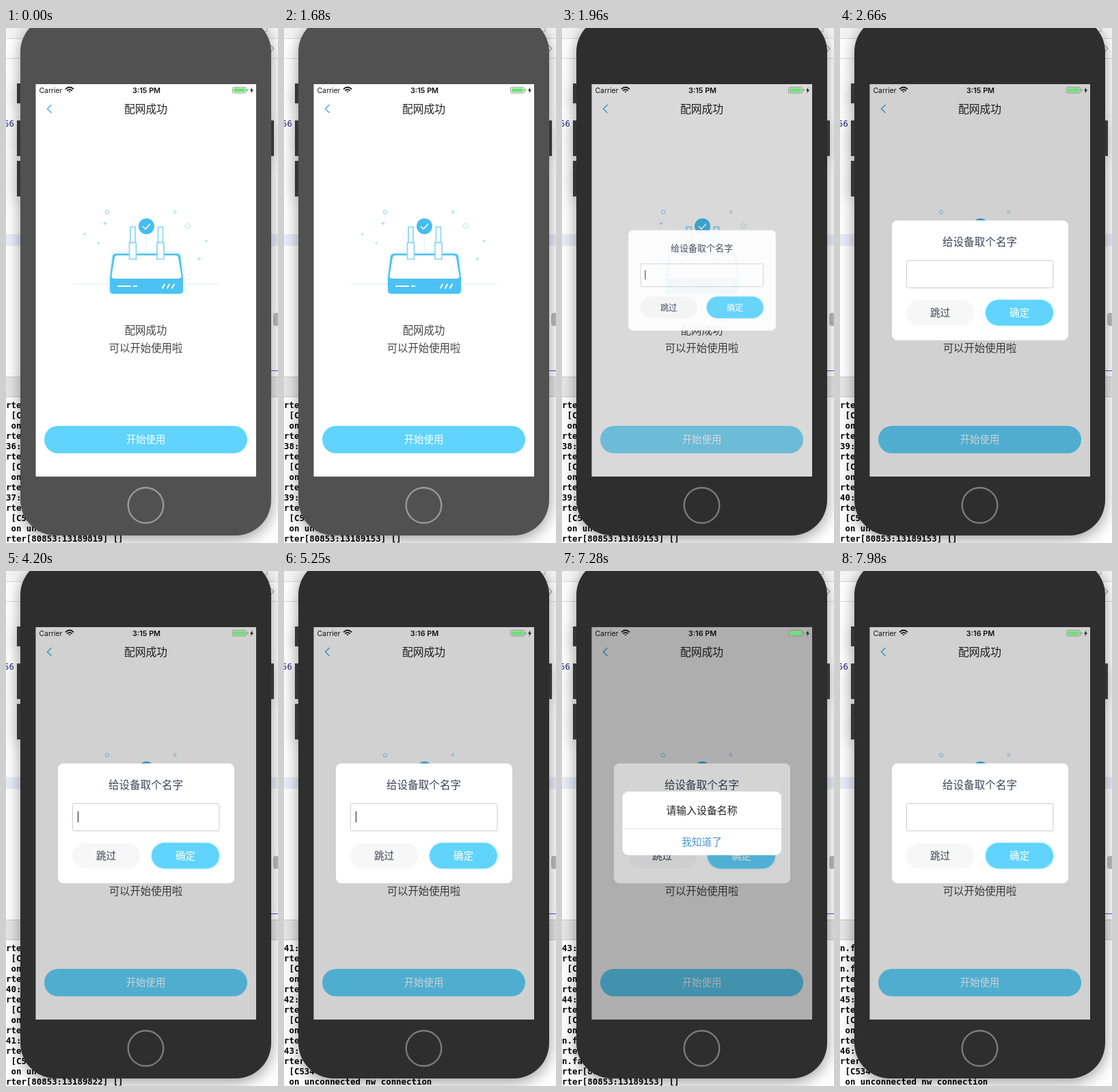
An HTML page that plays this animation: 398x752 px, repeating every 8000 ms.

```html
<!DOCTYPE html>
<html lang="zh">
<head>
<meta charset="utf-8">
<style>
html, body { margin: 0; height: 100%; overflow: hidden; background: #fff; }
svg { display: block; width: 100%; height: 100%; }
text { font-family: "Noto Sans CJK SC", "Noto Sans CJK", sans-serif; text-anchor: middle; }
.ui { font-family: Inter, sans-serif; fill: #111; }
#log text { font: bold 12.4px "DejaVu Sans Mono", monospace; text-anchor: start; white-space: pre; }
#phone { filter: drop-shadow(0 5px 11px rgba(0,0,0,.4)); }
</style>
</head>
<body>
<svg viewBox="0 0 398 752">
  <defs>
    <filter id="glow" x="-20%" y="-40%" width="140%" height="180%">
      <feDropShadow dx="0" dy="0" stdDeviation="2" flood-color="#60d4fd" flood-opacity=".5"/>
    </filter>
    <path id="plus" d="M-2.5 0H2.5M0-2.5V2.5"/>
    <g id="antenna">
      <rect x="-3.5" y="290.5" width="7" height="23"/>
      <rect x="-5" y="313.5" width="10" height="24"/>
    </g>
  </defs>

  <!-- editor window -->
  <rect width="398" height="752" fill="#fff"/>
  <rect width="398" height="16" fill="#f4f4f4"/>
  <path d="M0 15.5H398M0 44.5H398" stroke="#d8d8d8"/>
  <rect x="366" y="-6" width="16" height="11" fill="none" stroke="#aaa"/>
  <path d="M387 25l5 5-5 5" fill="none" stroke="#aaa" stroke-width="1.3"/>
  <text x="-3" y="144" style="font:12.4px 'DejaVu Sans Mono',monospace;text-anchor:start" fill="#2b2378">56</text>
  <rect y="301" width="398" height="17" fill="#e8edf9"/>
  <rect x="391" y="416" width="12" height="19" rx="4" fill="#bcbcbc"/>
  <path d="M380 500.5H398" stroke="#5a50c8"/>
  <rect y="510" width="398" height="28" fill="#e6e6e6"/>
  <path d="M0 509.5H398M0 538.5H398" stroke="#c8c8c8"/>
  <g id="log"></g>

  <!-- phone -->
  <g id="phone">
    <path d="M16 81h6v29h-6zM16 135h6v52h-6zM16 194h6v52h-6zM386 135h6v52h-6z" fill="#363636"/>
    <rect id="shell" x="21" y="-17" width="367" height="758" rx="52"/>
  </g>
  <circle id="home" cx="204.5" cy="697" r="25.8" fill="none" stroke-width="2.4"/>
  <rect x="43.5" y="82" width="322.5" height="573" fill="#fff"/>

  <path d="M66.5 112l-6 6 6 6" fill="none" stroke="#45b2e4" stroke-width="1.5"/>
  <text x="204.5" y="123.5" font-size="15.8" font-weight="500" fill="#222">配网成功</text>

  <!-- router -->
  <path d="M98 373.5H312" stroke="#e9eef0"/>
  <g fill="none" stroke="#8fd4f2">
    <circle cx="148" cy="269" r="2.7"/>
    <circle cx="247" cy="268.5" r="1.9"/>
    <path d="M265.5 284.8l4.2 4.2-4.2 4.2-4.2-4.2z" stroke="#a9dff5"/>
    <use href="#plus" x="145" y="285.5"/>
    <use href="#plus" x="283" y="337"/>
    <g stroke-width="1.4">
      <use href="#plus" transform="translate(115 301) scale(.7)"/>
      <use href="#plus" transform="translate(135 314) scale(.7)"/>
      <use href="#plus" transform="translate(293 311) scale(.7)"/>
    </g>
    <path d="M205.5 303V326" stroke="#dff3fb"/>
  </g>
  <g filter="url(#glow)">
    <path d="M161 329.5H250Q254 329.5 255 333L259 365V383Q259 388 254 388H157Q152 388 152 383V365L156 333Q157 329.5 161 329.5Z" fill="#4cc2f3"/>
    <path d="M163 332H248Q251 332 252 335L256.5 362Q256.5 366 252 366H159Q154.5 366 154.5 362L159 335Q160 332 163 332Z" fill="#fff"/>
  </g>
  <path d="M164 377H182M187 377H191M229 379.5l3-5M236 379.5l3-5M243 379.5l3-5" stroke="#fff" stroke-width="2.2" stroke-linecap="round"/>
  <g fill="#fff" stroke="#8ed8f6" stroke-width="1.8">
    <use href="#antenna" x="185.5"/>
    <use href="#antenna" x="226"/>
  </g>
  <circle cx="205.5" cy="289.5" r="11.5" fill="#45bdf0"/>
  <path d="M200 289.5l4 4 7-7.5" fill="none" stroke="#fff" stroke-width="1.7"/>

  <g font-size="15.4" fill="#444">
    <text x="204.5" y="447">配网成功</text>
    <text x="204.5" y="473">可以开始使用啦</text>
  </g>
  <g id="begin">
    <rect x="56" y="581" width="297" height="40" rx="20" fill="#60d4fd"/>
    <text x="204.5" y="606.3" font-size="14.4" fill="#fff">开始使用</text>
  </g>

  <rect id="shade1" x="43.5" y="82" width="322.5" height="573"/>

  <g id="dialog">
    <rect x="76" y="281" width="258" height="175" rx="8" fill="#fff"/>
    <text x="204.5" y="318" font-size="15.6" fill="#3a4358">给设备取个名字</text>
    <rect x="97.5" y="339.5" width="214.5" height="40" rx="2" fill="#fff" stroke="#cdcdcd"/>
    <path id="caret" d="M105.5 351V367" stroke="#555c68" stroke-width="1.6"/>
    <rect x="97" y="397" width="99.5" height="37.5" rx="18.7" fill="#f7f7f7"/>
    <text x="146.5" y="421.3" font-size="14.6" fill="#3a4358">跳过</text>
    <g id="confirm">
      <rect x="213" y="397" width="99" height="37.5" rx="18.7" fill="#60d4fd" filter="url(#glow)"/>
      <text x="262.5" y="421.3" font-size="14.6" fill="#fff">确定</text>
    </g>
  </g>

  <rect id="shade2" x="43.5" y="82" width="322.5" height="573"/>

  <g id="alert">
    <rect x="88.5" y="322" width="232.5" height="93" rx="9" fill="#fff"/>
    <text x="204.5" y="354.5" font-size="14.9" fill="#222">请输入设备名称</text>
    <path d="M88.5 376.5H321" stroke="#e2e2e2"/>
    <text x="204.5" y="401" font-size="14.8" fill="#4f95d2">我知道了</text>
  </g>

  <!-- status bar -->
  <text class="ui" x="65.5" y="94.5" font-size="10.4">Carrier</text>
  <g fill="none" stroke="#111" stroke-width="1.8">
    <path d="M87 89.3Q93 83.8 99 89.3M89.2 91.6Q93 88.2 96.8 91.6"/>
    <path d="M91.2 92.5h3.6L93 94.5z" fill="#111" stroke="none"/>
  </g>
  <text class="ui" id="clock" x="205.5" y="94.7" font-size="10.8" font-weight="600"></text>
  <rect x="331.5" y="86.5" width="20" height="8.5" rx="2" fill="none" stroke="#8a9a8a"/>
  <rect x="333" y="88" width="17" height="5.5" rx="1" fill="#6fe078"/>
  <path d="M353.5 89v3.5" stroke="#8a9a8a" stroke-width="1.3"/>
  <path d="M360.5 86.5l-3.5 5h2.3l-1 4 3.7-5.2h-2.4z" fill="#111"/>
</svg>
<script>
const LOOP = 8000, ROWS = 14, OPEN = 1738, WARN = 5757;
const $ = id => document.getElementById(id);

// Console: repeating five-line entries, 35 to 46
const threads = { 38: 13189819, 42: 13189822 };
const entries = [];
for (let n = 35; n <= 46; n++) {
  const head = `rter[80853:${threads[n] || 13189153}] `;
  if (n === 45) entries.push("n.facade", head, "n.facade", head);
  entries.push(head + "[]", n + ":", head, " [C534", " on unconnected nw_connection");
}
// [time, number of lines printed]
const prints = [[0, 16], [280, 21], [630, 26], [2590, 31], [3080, 36], [4550, 40],
  [4970, 45], [5600, 50], [6440, 52], [7070, 55], [7490, 59], [7770, 64]];

const rows = Array.from({ length: ROWS }, (_, i) => {
  const row = document.createElementNS("http://www.w3.org/2000/svg", "text");
  row.setAttribute("y", 554.5 + 15 * i);
  return $("log").appendChild(row);
});

function ramp(t, start, length) {
  const p = Math.min(1, Math.max(0, (t - start) / length));
  return p * p * (3 - 2 * p);
}

const fade = (id, opacity) => $(id).setAttribute("opacity", opacity);

function pop(id, scale, visible = 1) {
  $(id).setAttribute("transform", `translate(205 368.5) scale(${scale}) translate(-205 -368.5)`);
  fade(id, scale ** 0.4 * visible);
}

// A tapped button pales just before its panel opens, then recovers
function tap(id, t, opens) {
  fade(id, 1 - 0.6 * (ramp(t, opens - 50, 60) - ramp(t, opens + 100, 200)));
}

function draw(t) {
  const shown = prints.filter(p => p[0] <= t).pop()[1];
  rows.forEach((row, i) => row.textContent = entries[shown - ROWS + i]);

  const dark = t >= OPEN;
  $("shell").setAttribute("fill", dark ? "#2e2e2e" : "#515151");
  $("home").setAttribute("stroke", dark ? "#7b7b7b" : "#999");
  $("clock").textContent = t < 4900 ? "3:15 PM" : "3:16 PM";

  const open = ramp(t, OPEN, 300);
  tap("begin", t, OPEN);
  fade("shade1", 0.18 * open);
  pop("dialog", open);

  const warn = ramp(t, WARN, 300), stay = 1 - ramp(t, 7560, 250);
  tap("confirm", t, WARN);
  fade("shade2", 0.17 * warn * stay);
  pop("alert", warn, stay);

  const blink = (t - 1900) % 1000 < 600;
  fade("caret", blink && t < 5650 ? 1 : 0);
}

const start = performance.now();
function tick() {
  draw((performance.now() - start) % LOOP);
  requestAnimationFrame(tick);
}
tick();
</script>
</body>
</html>
```
